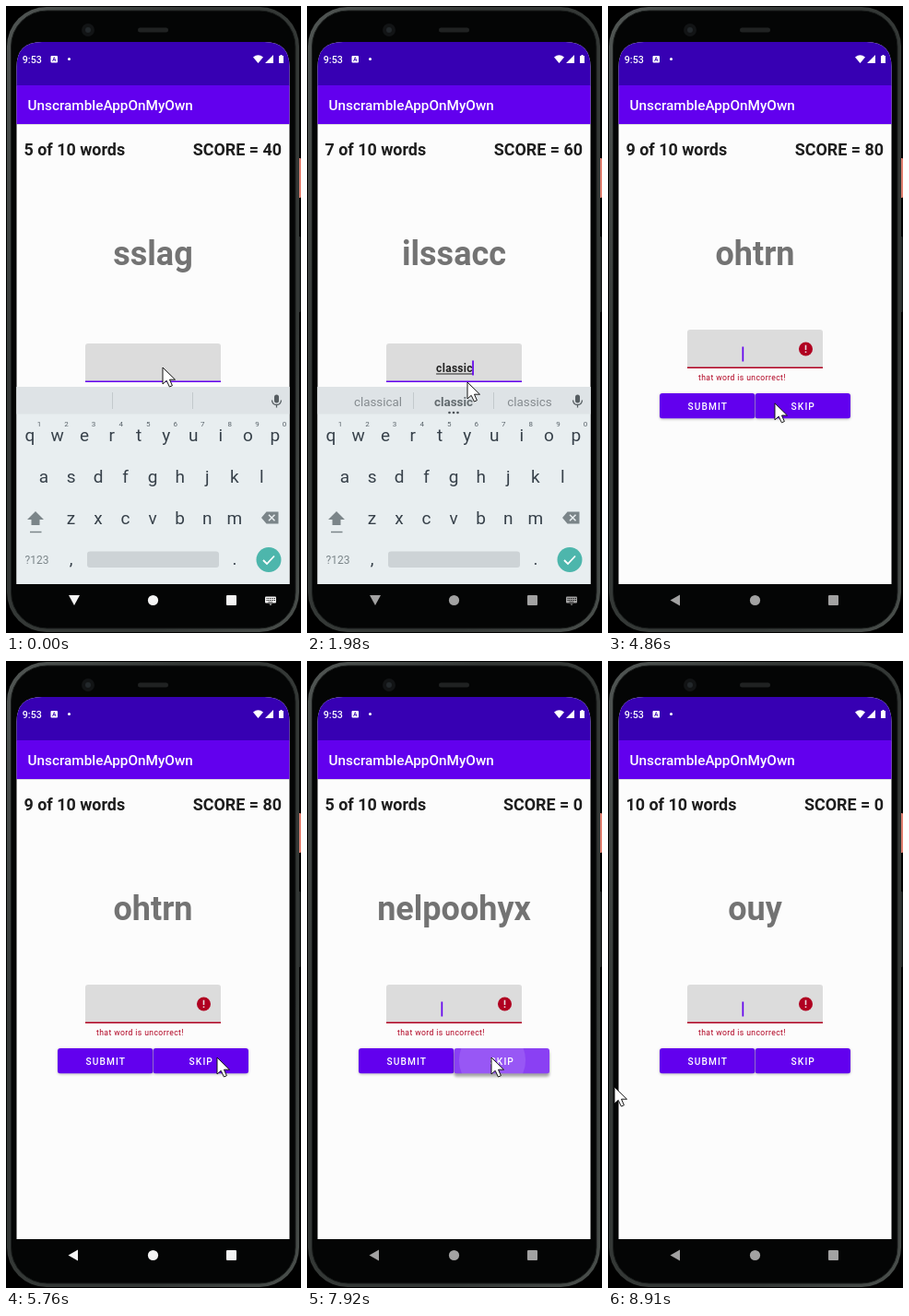
Animation of 320 by 680 pixels, one loop 8940 ms. Source, as an HTML page:

```html
<!DOCTYPE html>
<html lang="en">
<head>
<meta charset="utf-8">
<title>Unscramble game</title>
<style>
  html, body { margin: 0; width: 100%; height: 100%; overflow: hidden; background: #000; }
  svg { display: block; width: 320px; height: 680px; font-family: Roboto, "Noto Sans", sans-serif; }
  .mid { text-anchor: middle; }
  .bold { font-weight: 700; }
  .button { font-size: 10.2px; font-weight: 500; letter-spacing: 1.1px; }
  .action { letter-spacing: 1.25px; }
  .key { font-size: 19px; fill: #37414a; text-anchor: middle; }
  .hint { font-size: 8px; fill: #59636a; text-anchor: middle; }
  .suggest { font-size: 13.4px; fill: #858b8f; text-anchor: middle; }
</style>
</head>
<body>
<svg viewBox="0 0 320 680">
  <defs>
    <clipPath id="screenClip"><path d="M11.500 627V66Q11.500 39 39 39H280.500Q307.500 39 307.500 66V627Z"/></clipPath>
    <clipPath id="submitClip"><rect x="56" y="420" width="103.500" height="27.500" rx="3"/></clipPath>
    <clipPath id="skipClip"><rect x="159.500" y="420" width="103.500" height="27.500" rx="3"/></clipPath>
    <linearGradient id="rim" x2="1" y2="1">
      <stop offset="0" stop-color="#515654"/><stop offset=".3" stop-color="#343836"/>
      <stop offset=".75" stop-color="#343836"/><stop offset="1" stop-color="#4a4f4c"/>
    </linearGradient>
    <filter id="soft" x="-20%" y="-50%" width="140%" height="220%"><feGaussianBlur stdDeviation="1.800"/></filter>
  </defs>

  <rect width="320" height="680"/>
  <rect x="317" y="165" width="3" height="43" rx="1" fill="#e17f70"/>
  <rect x="317" y="250" width="2.500" height="82" rx="1" fill="#252827"/>
  <rect x="1" y="1" width="317" height="678" rx="43" fill="url(#rim)"/>
  <rect x="5.500" y="5" width="308.500" height="670" rx="39" fill="#040505" stroke="#1a1d1c"/>
  <circle cx="89" cy="26" r="7" fill="#121415"/><circle cx="89" cy="26" r="3" fill="#23282b"/>
  <rect x="143" y="23.500" width="33" height="5" rx="2.500" fill="#202222"/>

  <g clip-path="url(#screenClip)">
    <rect x="11" y="39" width="297" height="588" fill="#fcfcfc"/>
    <rect x="11" y="128" width="297" height="1" fill="#000" opacity=".12"/>
    <rect x="11" y="39" width="297" height="47.500" fill="#3700b3"/>
    <rect x="11" y="86" width="297" height="42" fill="#6200ee"/>
    <g fill="#fff">
      <text x="17.800" y="62" font-size="10.700" font-weight="500">9:53</text>
      <rect x="48.500" y="54" width="7.500" height="7.500" rx="1"/>
      <path d="M50.500 60L52.250 55.500L54 60M51 58.500H53.500" fill="none" stroke="#3700b3" stroke-width=".8"/>
      <circle cx="68.500" cy="57.500" r="1.500"/>
      <path d="M268 55.500Q273.500 51 279 55.500L273.500 62ZM281 62H290V53ZM296 54H297.500V53H299.500V54H301V62H296Z"/>
      <text x="23.500" y="113" font-size="15.300" font-weight="500">UnscrambleAppOnMyOwn</text>
    </g>
    <g class="bold">
      <text id="count" x="19.500" y="162" font-size="17.900" fill="#1d1d1d"/>
      <text id="score" x="299" y="162" font-size="17.900" fill="#1d1d1d" text-anchor="end"/>
      <text id="scramble" class="mid" x="159.500" y="281" font-size="36" fill="#737373"/>
    </g>

    <g id="field">
      <path d="M86 408V369Q86 366 89 366H230Q233 366 233 369V408Z" fill="#dcdcdc"/>
      <rect id="line" x="86" y="406.500" width="147" height="1.500"/>
      <text id="guess" class="mid bold" x="160" y="397" font-size="12" letter-spacing=".3" fill="#222"/>
      <rect id="underline" y="398.500" height="1" fill="#222"/>
      <rect id="caret" y="384.500" width="1.700" height="16" fill="#6200ee"/>
      <g id="error" fill="#b00020">
        <circle cx="214.500" cy="387" r="7.500"/>
        <path d="M213.700 382.800H215.300V388H213.700ZM213.700 389.500H215.300V391.100H213.700Z" fill="#e6dcdd"/>
        <text x="98" y="420.500" font-size="8.600" letter-spacing=".4">that word is uncorrect!</text>
      </g>
    </g>

    <g id="buttons"></g>
    <g id="keyboard"></g>

    <rect id="scrim" x="11" y="39" width="297" height="588"/>
    <g id="dialog">
      <rect x="37" y="294" width="244" height="128" rx="3" opacity=".3" filter="url(#soft)"/>
      <rect x="37" y="292" width="244" height="128" rx="3" fill="#fff"/>
      <text x="55" y="318" font-size="12.200" fill="#222">GAME OVER!</text>
      <g font-size="10.100" fill="#555">
        <text x="55" y="339">The game is over, your score 80 , do you</text>
        <text x="55" y="351">want to continue?</text>
      </g>
      <g class="button action" fill="#6200ee">
        <text x="91.500" y="387">EXIT GAME!</text><text x="177" y="387">RESTART GAME!</text>
      </g>
    </g>
  </g>

  <g id="nav">
    <path id="back"/>
    <circle cx="159.500" cy="644.500" r="5.600"/>
    <rect x="239" y="639" width="11" height="11" rx="1"/>
    <g id="imeIcon">
      <rect x="281" y="640.500" width="12" height="7" rx="1"/>
      <path d="M282.500 642.500H292M282.500 644.500H292M284.500 646.300H289.500" stroke="#000" stroke-width=".9" stroke-dasharray="1 .7"/>
      <path d="M285.500 648.500H288.500L287 650Z"/>
    </g>
  </g>
  <path id="mouse" d="M0 0V18L4.200 14.300L7.400 21L10.400 19.700L7.500 13.200H13.500Z" fill="#fff" stroke="#151515" stroke-linejoin="round"/>
</svg>
<script>
const LOOP = 8940, STEP = 30, LETTER = 45;
const $ = id => document.getElementById(id);
const clamp = v => Math.max(0, Math.min(1, v));
const show = (id, on) => $(id).style.display = on ? '' : 'none';
const put = (id, text) => { if ($(id).textContent !== text) $(id).textContent = text; };
const set = (id, attrs) => { for (const k in attrs) $(id).setAttribute(k, attrs[k]); };

const rounds = [
  { word: 'sslag', guess: 'glass', start: 0, open: -200, type: 120, close: 560 },
  { word: 'dbri', guess: 'bird', start: 800, open: 920, type: 980, close: 1220 },
  { word: 'ilssacc', guess: 'classic', start: 1400, open: 1560, type: 1640, close: 2130 },
  { word: 'dlwro', guess: 'world', start: 2310, open: 2450, type: 2510, close: 2760 },
  { word: 'ohtrn', guess: 'do', start: 2940, open: 3120, type: 3300, close: 3480 }
];
const WRONG = 3960, LAST_WORD = 5900, GAME_OVER = 6150, CLOSE_DIALOG = 7080, RESTART = 7200;
const secondGame = ['tbleat', 'aerwt', 'cmisu', 'gdnrea', 'nelpoohyx', 'ehsou', 'lpnat', 'tfriu', 'nomey', 'ouy'];
const skips = secondGame.slice(1).map((_, i) => 7364 + i * 162 - Math.max(0, i - 3) * 12);
const clicks = {
  submit: [...rounds.slice(1).map(r => r.start), WRONG],
  skip: [LAST_WORD, GAME_OVER, ...skips]
};

// time, x, y of the pointer tip
const path = [
  [0, 170, 392], [620, 170, 392], [760, 108, 432], [820, 108, 432], [910, 172, 400],
  [1250, 172, 400], [1370, 108, 432], [1420, 108, 432], [1540, 174, 408], [2150, 174, 408],
  [2280, 108, 432], [2330, 108, 432], [2440, 172, 404], [2790, 172, 404], [2910, 108, 432],
  [2960, 108, 432], [3100, 227, 383.5], [3620, 227, 383.5], [3900, 112, 432], [4300, 112, 432],
  [5300, 229, 430], [6250, 229, 430], [6600, 230, 382], [7200, 230, 382], [7320, 200, 430],
  [8610, 200, 430], [8850, 7, 462], [LOOP, 7, 462]
];

function pointer(t) {
  const i = path.findIndex(p => p[0] > t), [t0, x0, y0] = path[i - 1], [t1, x1, y1] = path[i];
  const u = (t - t0) / (t1 - t0), e = u * u * (3 - 2 * u);
  return [x0 + (x1 - x0) * e, y0 + (y1 - y0) * e];
}

function buildButtons() {
  const button = (id, x, label) => `
    <rect id="${id}Shadow" x="${x}" width="103.500" height="27.500" rx="3" filter="url(#soft)"/>
    <g clip-path="url(#${id}Clip)">
      <rect x="${x}" y="420" width="103.500" height="27.500" fill="#6200ee"/>
      <text class="button mid" x="${x + 52.3}" y="438" fill="#fff">${label}</text>
      <rect id="${id}Flash" x="${x}" y="420" width="103.500" height="27.500" fill="#fff"/>
      <circle id="${id}Ripple" cy="433" fill="#fff"/>
    </g>`;
  $('buttons').innerHTML = button('submit', 56, 'SUBMIT') + button('skip', 159.5, 'SKIP');
}

function buildKeyboard() {
  const row = (keys, x, y) => [...keys].map((k, i) =>
    `<text class="key" x="${x + i * 29.55}" y="${y}">${k}</text>`).join('');
  const hints = [...'1234567890'].map((k, i) =>
    `<text class="hint" x="${36 + i * 29.55}" y="456">${k}</text>`).join('');
  $('keyboard').innerHTML = `
    <rect x="11" y="413" width="297" height="214" fill="#e8eef0"/>
    <rect x="11" y="413" width="297" height="29.500" fill="#dee3e6"/>
    <path d="M115.500 419V437M202.500 419V437" stroke="#c3c9cc"/>
    <text id="left" class="suggest" x="77" y="434"></text>
    <text id="centre" class="suggest bold" x="159" y="434" style="fill:#626a6e"></text>
    <text id="right" class="suggest" x="241.500" y="434"></text>
    <g id="dots" fill="#4b5257"><circle cx="154.500" cy="441" r="1.300"/><circle cx="159" cy="441" r="1.300"/><circle cx="163.500" cy="441" r="1.300"/></g>
    <rect x="291" y="421.500" width="5" height="9" rx="2.500" fill="#565d61"/>
    <path d="M288.500 427.500Q289 432.500 293.500 432.500T298.500 427.500M293.500 432.500V435.500" fill="none" stroke="#565d61" stroke-width="1.300"/>
    ${row('qwertyuiop', 26, 472)}${hints}${row('asdfghjkl', 41, 517)}${row('zxcvbnm', 70.5, 562)}
    <path d="M32 548L41 557H36.500V563H27.500V557H23Z" fill="#7b8589"/>
    <path d="M26 570.500H38.500" stroke="#7b8589" stroke-width="1.500"/>
    <path d="M277 555L282.500 548.500H295.500V561.500H282.500Z" fill="#7b8589"/>
    <path d="M285 551.800L291.500 558.300M291.500 551.800L285 558.300" stroke="#e8eef0" stroke-width="1.500"/>
    <text x="33.500" y="605" class="mid" font-size="12" fill="#7b8589">?123</text>
    <text class="key" x="70.500" y="606">,</text><text class="key" x="248" y="606">.</text>
    <rect x="88" y="591.500" width="143" height="17.500" rx="3" fill="#cdd3d6"/>
    <circle cx="285" cy="600.500" r="13.500" fill="#4db6ac"/>
    <path d="M279 601L283 605L291 596.500" fill="none" stroke="#fff" stroke-width="1.800"/>`;
}

function drawRipple(id, t) {
  const last = clicks[id].filter(c => c <= t).pop();
  const age = last === undefined ? 999 : t - last;
  const glow = 1 - clamp((age - 100) / 180);
  set(id + 'Flash', { opacity: .25 * glow });
  set(id + 'Ripple', { cx: id === 'skip' ? 201 : 108, r: 20 + age * .23, opacity: .12 * glow });
  set(id + 'Shadow', { opacity: .25 + .1 * glow, y: 420.7 + 2.5 * glow });
}

function drawField(t, round, open) {
  const wrong = t >= WRONG;
  const typed = wrong ? '' : round.guess.slice(0, Math.max(0, Math.floor((t - round.type) / LETTER)));
  put('guess', typed);
  const width = typed ? $('guess').getComputedTextLength() : 0;
  set('field', { transform: `translate(0 ${wrong ? -15 : 0})` });
  set('line', { fill: wrong ? '#b00020' : '#6200ee' });
  set('underline', { x: 160 - width / 2, width });
  set('caret', { x: wrong ? 145.5 : 159.3 + width / 2 });
  show('underline', open && typed);
  show('caret', typed || t >= RESTART || (t < GAME_OVER && Math.floor(t / 180) % 2));
  show('error', wrong);
  put('left', typed && typed + 'al');
  put('centre', typed);
  put('right', typed && typed + 's');
  show('dots', typed);
}

function draw(t) {
  const index = rounds.filter(r => r.start <= t).length - 1, round = rounds[index];
  const skipped = skips.filter(s => s <= t).length;
  const again = t >= RESTART;
  const number = again ? 1 + skipped : t >= LAST_WORD ? 10 : 5 + index;
  put('count', `${number} of 10 words`);
  put('score', `SCORE = ${again ? 0 : 40 + index * 10}`);
  put('scramble', again ? secondGame[skipped] : t >= LAST_WORD ? 'azzpi' : round.word);

  const slide = clamp((t - round.open) / 80) * (1 - clamp((t - round.close) / 80));
  const open = slide > .5;
  set('keyboard', { transform: `translate(0 ${(1 - slide) * 214})` });
  drawField(t, round, open);
  drawRipple('submit', t);
  drawRipple('skip', t);

  const fade = clamp((t - GAME_OVER - 30) / 90) * (1 - clamp((t - CLOSE_DIALOG) / 120));
  set('scrim', { opacity: .58 * fade });
  set('dialog', { opacity: fade });

  const bright = t < 900 || (t >= 5000 && t < GAME_OVER + 30);
  set('nav', { fill: bright ? '#f4f4f4' : '#a2a2a2' });
  set('back', { d: open ? 'M68 639H80L74 650Z' : 'M78 638.500V650.500L67.500 644.500Z' });
  show('imeIcon', open);
  set('mouse', { transform: `translate(${pointer(t)})` });
}

buildButtons();
buildKeyboard();
const began = performance.now();
function tick() {
  const t = (performance.now() - began) % LOOP;
  draw(Math.floor(t / STEP) * STEP);
  requestAnimationFrame(tick);
}
tick();
</script>
</body>
</html>
```
